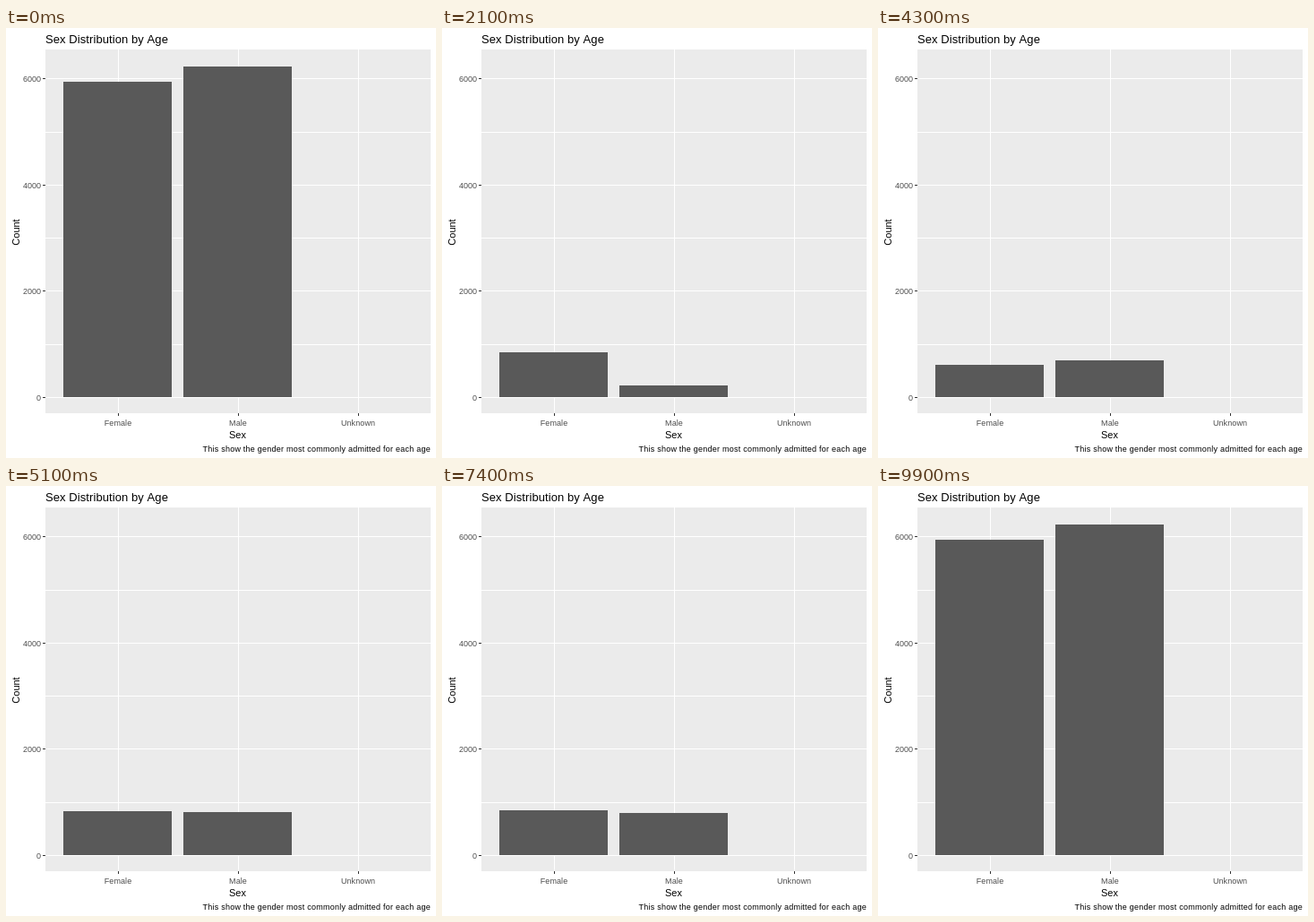
Write an HTML page with a canvas that moves like this. It is 480 by 480 pixels and loops after 10000 ms.

```html
<!DOCTYPE html>
<html lang="en">
<head>
<meta charset="utf-8">
<title>Sex Distribution by Age</title>
<style>
html, body { margin: 0; width: 100%; height: 100%; overflow: hidden; background: #fff; }
canvas { display: block; width: 480px; height: 480px; }
</style>
</head>
<body>
<canvas id="chart" width="480" height="480"></canvas>
<script>
const ctx = document.getElementById('chart').getContext('2d');
const STEP = 100, STEPS = 100, LAST_AGE = 98;
const BASE = 412, PITCH = 134;
const PANEL = { x: 44, y: 24, w: 430, h: 406 };

const yOf = count => Math.round(411.8 - count * 0.05925);

// Bell curve with separate widths left and right of its centre
function bell(age, height, center, left, right) {
  const d = (age - center) / (age < center ? left : right);
  return height * Math.exp(-d * d / 2);
}

const newborn = (age, height) => height * Math.exp(-4 * age);
const child = age => 4 * Math.exp(-age / 6);
const survival = age => 1 / (1 + Math.exp((age - 86.85) / 2));

// Bar heights in pixels by age
const female = age => newborn(age, 347.6) + child(age)
  + bell(age, 65, 27, 8.3, 9)
  + bell(age, 60, 59, 11.5, 25) * survival(age);

const male = age => newborn(age, 364.2) + child(age)
  + bell(age, 6.2, 15, 7, 5)
  + bell(age, 32.5, 40, 12.2, 10)
  + bell(age, 61, 64, 11, 13.8) * survival(age);

function rect(x, y, w, h, color) {
  ctx.fillStyle = color;
  ctx.fillRect(x, y, w, h);
}

function label(text, x, y, size, color, align = 'left', spacing = 0) {
  ctx.font = `${size}px "Liberation Sans", Arial, sans-serif`;
  ctx.letterSpacing = `${spacing}px`;
  ctx.textAlign = align;
  ctx.fillStyle = color;
  ctx.fillText(text, x, y);
}

function drawAxes() {
  rect(0, 0, 480, 480, '#fff');
  rect(PANEL.x, PANEL.y, PANEL.w, PANEL.h, '#ebebeb');
  for (let count = 0; count <= 6000; count += 1000) {
    const y = yOf(count);
    rect(PANEL.x, y, PANEL.w, 1, '#fff');
    if (count % 2000) continue;
    rect(41, y, 3, 1, '#333');
    label(count, 39, y + 4, 9, '#4d4d4d', 'right');
  }
  ['Female', 'Male', 'Unknown'].forEach((name, i) => {
    const x = 125 + i * PITCH;
    rect(x, PANEL.y, 1, PANEL.h, '#fff');
    rect(x, 430, 1, 3, '#333');
    label(name, x, 444, 9, '#4d4d4d', 'center', 0.1);
  });
}

function drawBars(age) {
  [female, male].forEach((curve, i) => {
    const h = Math.round(curve(age));
    rect(64 + i * PITCH, BASE - h, 121, h, '#595959');
  });
}

function drawLabels() {
  label('Sex Distribution by Age', 44, 17, 13, '#000', 'left', 0.08);
  label('Sex', 258.5, 458, 11, '#000', 'center');
  label('This show the gender most commonly admitted for each age',
    474, 473, 9, '#000', 'right', 0.24);
  ctx.save();
  ctx.translate(15, 228);
  ctx.rotate(-Math.PI / 2);
  label('Count', 0, 0, 11, '#000', 'center');
  ctx.restore();
}

const start = performance.now();
function tick() {
  const step = Math.floor((performance.now() - start) / STEP) % STEPS;
  drawAxes();
  drawBars(step % (LAST_AGE + 1));
  drawLabels();
  requestAnimationFrame(tick);
}
tick();
</script>
</body>
</html>
```
